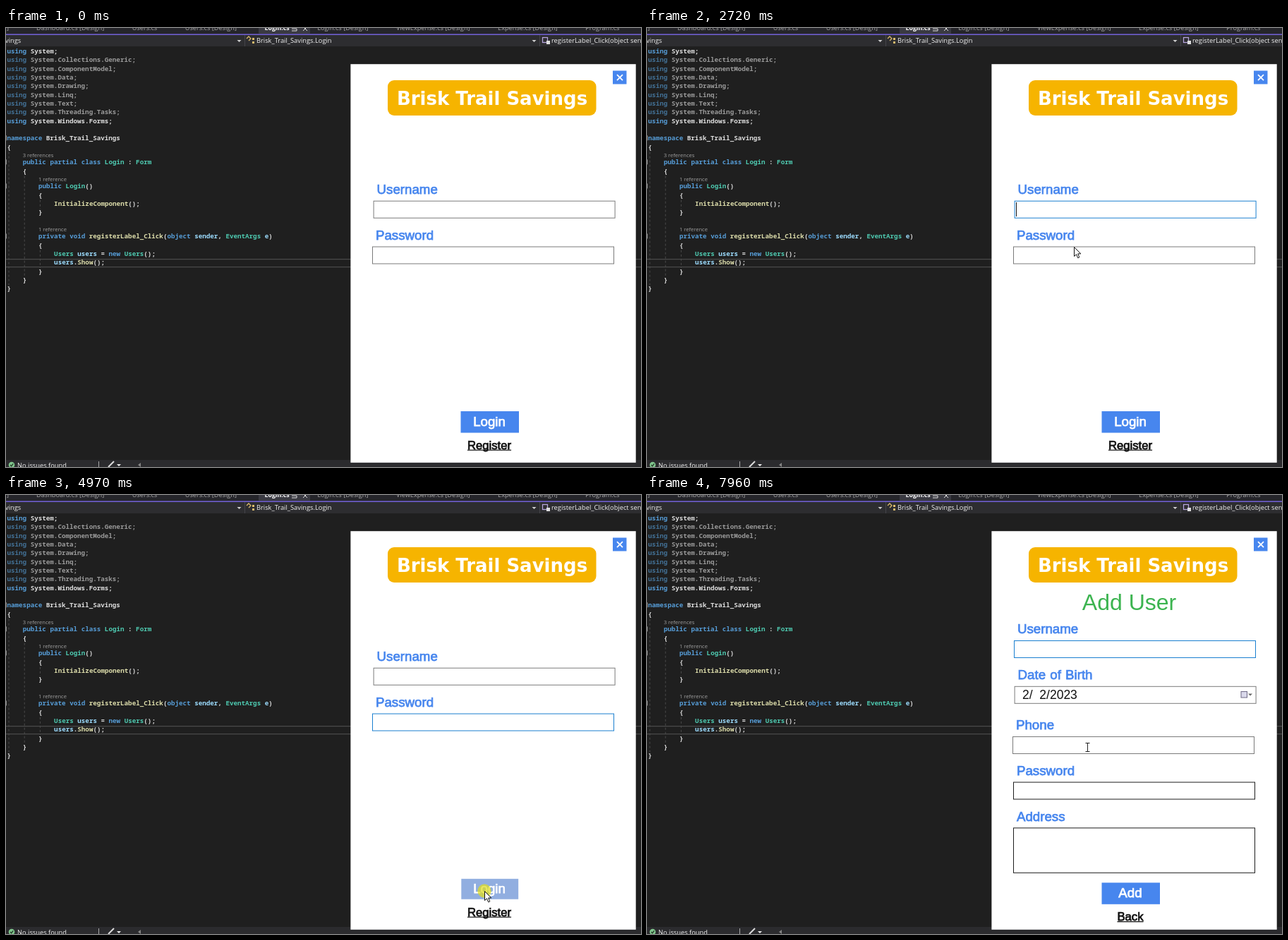
Animation, 900 px wide and 622 px high, one loop 8 s. Source, as an HTML page with a canvas:

```html
<!DOCTYPE html>
<html lang="en">
<head>
<meta charset="utf-8">
<title>Login form demo</title>
<style>
  html, body { margin: 0; width: 100%; height: 100%; overflow: hidden; background: #1f1f1f; }
  canvas { display: block; width: 900px; height: 622px; }
</style>
</head>
<body>
<canvas id="stage" width="900" height="622"></canvas>
<script>
const ctx = document.getElementById('stage').getContext('2d');
const LOOP = 8000;
const BLUE = '#4786ee', PALE = '#91aee0', GRAY = '#7a7a7a', FOCUS = '#1a7fd0', DARK = '#1c1c1c', INK = '#111';
const SANS = '"Liberation Sans", Arial, sans-serif';
const UI = '"Open Sans", "Noto Sans", sans-serif';
const MONO = '600 9.22px "Noto Sans Mono", monospace';
const TITLE = 'Brisk Trail Savings';
const SPACE = TITLE.replace(/ /g, '_');

// ---- drawing helpers ----
function rect(x, y, w, h, color) {
  ctx.fillStyle = color;
  ctx.fillRect(x, y, w, h);
}

// Returns the x position after the text.
function text(str, x, y, font, color, align = 'left') {
  ctx.font = font;
  ctx.fillStyle = color;
  ctx.textAlign = align;
  ctx.fillText(str, x, y);
  return x + ctx.measureText(str).width;
}

function line(points, color, width = 1) {
  ctx.beginPath();
  points.forEach(([x, y]) => ctx.lineTo(x, y));
  ctx.strokeStyle = color;
  ctx.lineWidth = width;
  ctx.stroke();
}

function shape(points, color) {
  ctx.beginPath();
  points.forEach(([x, y]) => ctx.lineTo(x, y));
  ctx.fillStyle = color;
  ctx.fill();
}

function disc(x, y, r, color) {
  ctx.beginPath();
  ctx.arc(x, y, r, 0, Math.PI * 2);
  ctx.fillStyle = color;
  ctx.fill();
}

function cross(x, y, r, color, width) {
  line([[x - r, y - r], [x + r, y + r]], color, width);
  line([[x + r, y - r], [x - r, y + r]], color, width);
}

function arrowDown(x, y, color = '#d0d0d0') {
  shape([[x - 3, y - 1.5], [x + 3, y - 1.5], [x, y + 1.5]], color);
}

// Semi-bold label: regular letters thickened with a thin outline.
function label(str, x, y, color = BLUE, size = 18.7, align = 'left') {
  text(str, x, y, `${size}px ${SANS}`, color, align);
  ctx.strokeStyle = color;
  ctx.lineWidth = 0.75;
  ctx.strokeText(str, x, y);
}

// ---- editor ----
// A leading "^" marks a line with a reference count above it.
const SOURCE = `using System;
using System.Collections.Generic;
using System.ComponentModel;
using System.Data;
using System.Drawing;
using System.Linq;
using System.Text;
using System.Threading.Tasks;
using System.Windows.Forms;

namespace ${SPACE}
{
^3 references^public partial class Login : Form
{
^1 reference^public Login()
{
InitializeComponent();
}

^1 reference^private void registerLabel_Click(object sender, EventArgs e)
{
Users users = new Users();
users.Show();
}
}
}`.split('\n');
const UNUSED = /\.(Coll|Comp|Data|Draw|Linq|Text|Thr)/;
const SYNTAX = [
  [/^(using|namespace|public|private|partial|class|void|object|new)$/, '#569cd6'],
  [/^(Login|Form|Users|EventArgs)$/, '#4ec9b0'],
  [/^(InitializeComponent|registerLabel_Click|Show)$/, '#dcdcaa'],
  [/^(users|sender|e)$/, '#9cdcfe'],
  [/./, '#dcdcdc']
];

function codeLine(str, x, y) {
  for (const word of str.match(/\w+|\W+/g) || []) {
    x = text(word, x, y, MONO, SYNTAX.find(([rule]) => rule.test(word))[1]);
  }
}

function drawCode() {
  const open = [];
  let y = 36;
  for (const row of SOURCE) {
    const [, count, code] = row.startsWith('^') ? row.split('^') : [0, '', row];
    let start = null;
    if (code === '}') start = open.pop();
    const x = 1.5 + 22.2 * open.length;
    if (count) {
      text(count, x, y - 1, `7.6px ${UI}`, '#a0a0a0');
      y += 9.4;
    }
    if (start) {
      ctx.setLineDash([3, 3]);
      line([[x + 2.5, start + 4], [x + 2.5, y - 8]], '#4c4c4c');
      ctx.setLineDash([]);
    }
    if (/^(namespace|public|private)/.test(code)) rect(0, y - 7, 1, 7, '#8a8a8a');
    ctx.globalAlpha = UNUSED.test(code) ? 0.65 : 1;
    codeLine(code, x, y);
    ctx.globalAlpha = 1;
    if (code === '{') open.push(y);
    y += 12.33;
  }
}

function drawTabs() {
  rect(0, 0, 900, 10, '#25252a');
  rect(358, 0, 73, 8, '#3a3a42');
  const font = `9.2px ${UI}`;
  let x = 43;
  for (const name of ['Dashboard', 'Users', 'Users+', 'Login', 'Login+', 'ViewExpense+', 'Expense+', 'Program']) {
    const active = name === 'Login';
    const title = name === 'Dashboard' ? name + '.cs [Design]' : name.replace('+', '') + '.cs' + (name.endsWith('+') ? ' [Design]' : '');
    x = 39.5 + text(title, x, 3.4, active ? `bold 8.8px ${UI}` : font, active ? '#fff' : '#a5a5a5');
  }
  text(']', 1, 3.4, font, '#a5a5a5');
  line([[405, 1], [412, 1], [412, 4], [405, 4]], '#ddd');
  cross(424, 1, 3, '#ddd', 1);
  rect(0, 8.4, 900, 1.6, '#6f5fd0');
}

function drawNavBar() {
  const font = `9.3px ${UI}`;
  rect(0, 10, 900, 16, '#2d2d30');
  for (const x of [338, 756]) {
    rect(x, 10, 1, 16, '#45454a');
    arrowDown(x - 7.5, 18.5);
  }
  text('vings', -1, 21, font, '#eee');
  text(SPACE + '.Login', 355, 21, font, '#f1f1f1');
  text('registerLabel_Click(object sender, EventArgs e)', 773, 21, font, '#f1f1f1');
  line([[341, 15], [344, 12], [347, 15], [344, 18]], '#d9b96c', 1.3);
  rect(349, 14, 3, 3, '#d9b96c');
  rect(349, 19, 3, 3, '#d9b96c');
  ctx.strokeStyle = '#b6a4dd';
  ctx.strokeRect(760.5, 13.5, 7, 7);
  rect(766, 18, 5, 5, '#ddd');
}

function drawStatus() {
  rect(0, 612, 900, 10, '#2b2b2e');
  disc(8, 619, 4.3, '#7fc58c');
  line([[6, 619], [7.6, 620.7], [10.2, 617.3]], '#1f3324', 1.2);
  text('No issues found', 16, 623, `9.3px ${UI}`, '#eee');
  rect(131, 614, 1, 8, '#aaa');
  line([[153, 614], [145, 622]], '#ddd', 2);
  arrowDown(160, 619.5, '#eee');
  shape([[191, 616], [191, 622], [187, 619]], '#858585');
}

function drawEditor() {
  rect(0, 0, 900, 622, '#1f1f1f');
  drawTabs();
  drawNavBar();
  rect(0, 327, 900, 1.2, '#4a4a4a');
  rect(0, 338, 900, 1.2, '#4a4a4a');
  drawCode();
  drawStatus();
}

// ---- pointer ----
// Runs of [time, x, y]; the pointer is hidden between runs.
const RUNS = [
  [[545, 831, 582], [900, 740, 520], [1330, 678, 562], [1400, 678, 562], [1660, 684, 529], [2060, 606, 231],
   [2200, 603, 257], [2720, 605, 310], [3050, 610, 322], [3380, 614, 415], [3900, 679, 548],
   [4040, 678, 561], [5040, 678, 561], [5360, 679, 579], [5560, 679, 579]],
  [[6060, 665, 597], [6200, 665, 597], [6400, 678, 606], [6700, 685, 595], [6960, 685, 595]],
  [[7770, 683, 593], [7960, 624, 357], [LOOP, 624, 357]]
];
const CLICKS = [[2250, 2390, 603, 257], [3000, 3130, 610, 322], [4780, 5040, 678, 561], [7140, 7340, 683, 594]];

function pointerAt(t) {
  const run = RUNS.find(r => t >= r[0][0] && t < r[r.length - 1][0]);
  if (!run) return null;
  const i = run.findIndex(key => key[0] > t);
  const [t0, x0, y0] = run[i - 1], [t1, x1, y1] = run[i];
  const f = (t - t0) / (t1 - t0);
  return { x: Math.round(x0 + (x1 - x0) * f), y: Math.round(y0 + (y1 - y0) * f) };
}

function over(p, x, y, w, h) {
  return !!p && p.x > x && p.x < x + w && p.y > y && p.y < y + h;
}

function drawPointer({ x, y }, beam) {
  ctx.save();
  ctx.translate(x + 0.5, y + 0.5);
  if (beam) {
    for (const dy of [-6, 6]) line([[-3, dy], [3, dy]], '#222');
    line([[0, -6], [0, 6]], '#222');
  } else {
    const arrow = [[0, 0], [0, 13], [3, 10.2], [5.2, 15.3], [7.3, 14.4], [5.2, 9.4], [9.3, 9.4], [0, 0]];
    shape(arrow, '#fff');
    line(arrow, INK);
  }
  ctx.restore();
}

// ---- window ----
function drawWindow() {
  rect(488.4, 51.2, 404.3, 564.6, '#fff');
  ctx.beginPath();
  ctx.roundRect(541, 74, 295.5, 50, 9);
  ctx.fillStyle = '#f6b400';
  ctx.fill();
  text(TITLE, 689, 108.5, 'bold 26px "DejaVu Sans", sans-serif', '#fff', 'center');
  rect(860, 60.5, 19.5, 19, BLUE);
  cross(870, 70.2, 4, '#fff', 1.8);
}

function field(name, x, y, color, caret = false, h = 24) {
  label(name, x + 5, y - 9.7);
  rect(x, y, 343, h + 1, color);
  rect(x + 1, y + 1, 341, h - 1, '#fff');
  if (caret) rect(Math.round(x + 2), Math.round(y + 2), 1, 20, INK);
}

function button(str, y, color, inset = 0) {
  rect(644.5 + inset, y + inset, 82.5 - 2 * inset, 30.5 - 2 * inset, color);
  label(str, 685, y + 21, '#fff', 18.7, 'center');
}

function link(str, y) {
  label(str, 685, y, INK, 16.7, 'center');
  const w = ctx.measureText(str).width;
  rect(685 - w / 2, y + 1, w, 1.2, INK);
}

// Both forms return whether the pointer is a text beam.
function drawLogin(t, p) {
  const inUser = over(p, 520, 246, 343, 24), inPass = over(p, 519, 311, 343, 23);
  const userOn = t >= 2250 && t < 3110, passOn = t >= 3110 && t < 5040;
  const tone = (focused, hover) => focused ? FOCUS : hover ? DARK : GRAY;
  const blinkOn = t < 3870 || t >= 4400 && t < 4930;
  field('Username', 520.6, 244.7, tone(userOn, inUser), userOn && t < 2850);
  field('Password', 519, 309.5, tone(passOn, inPass), passOn && blinkOn);

  const pressed = t >= 4780;
  const hot = pressed && t < 6260 || over(p, 644, 543, 83, 31);
  button('Login', 543, hot ? PALE : BLUE, pressed ? 0.8 : 0);
  link('Register', 596.5);
  return inUser || inPass;
}

function drawSignup(t, p) {
  const passed = y => !!p && p.y < y;
  text('Add User', 683.5, 163, `32px ${SANS}`, '#3cb450', 'center');
  field('Username', 520, 206, FOCUS, t < 7820);
  ctx.wordSpacing = '1px';
  field('Date of Birth', 520.6, 270.8, GRAY);
  ctx.wordSpacing = '0px';
  text('2/  2/2023', 532, 289, `17.5px ${SANS}`, INK);
  rect(841.5, 278, 9.5, 9.5, '#6f6a86');
  rect(842.5, 279, 7.5, 7.5, '#d9d8ea');
  arrowDown(855, 283, '#666');
  field('Phone', 518, 342, GRAY);
  field('Password', 519, 406.5, passed(431) ? DARK : GRAY);
  field('Address', 519, 471.3, passed(535) ? DARK : GRAY, false, 63.5);
  button('Add', 549.3, BLUE);
  link('Back', 603);
  return passed(535);
}

function frame(t) {
  const p = pointerAt(t);
  drawEditor();
  drawWindow();
  const beam = (t < 7340 ? drawLogin : drawSignup)(t, p);
  const click = CLICKS.find(([from, to]) => t >= from && t < to);
  if (click) disc(click[2], click[3], 9.7, 'rgba(226, 222, 24, 0.7)');
  if (p) drawPointer(p, beam);
}

const start = performance.now();
function loop() {
  frame((performance.now() - start) % LOOP);
  requestAnimationFrame(loop);
}
loop();
</script>
</body>
</html>
```
